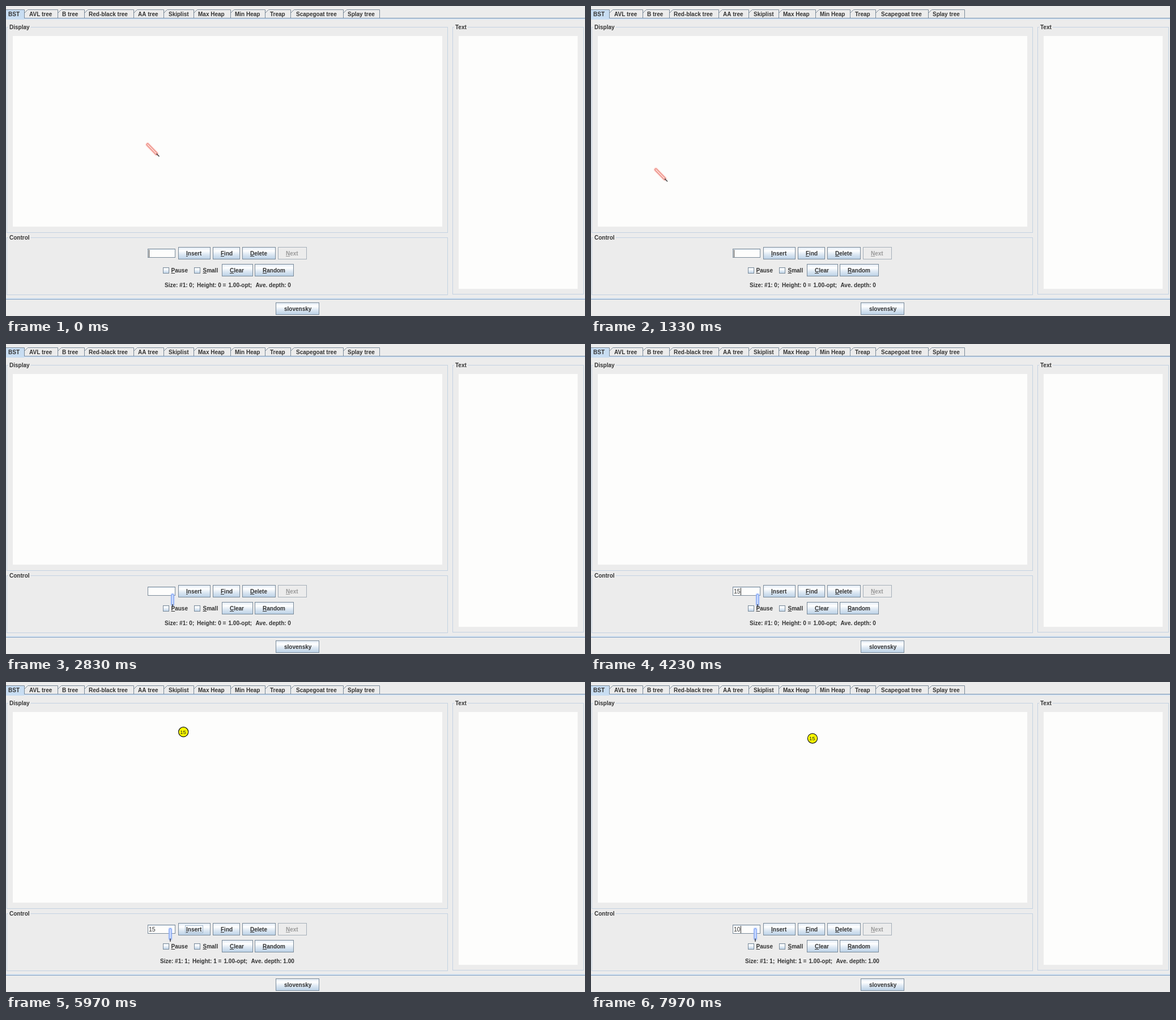
Write an HTML page with a canvas that moves like this. It is 1022 by 548 pixels and loops after 8000 ms.

```html
<!DOCTYPE html>
<html lang="en">
<head>
<meta charset="utf-8">
<title>Search tree demo</title>
<style>
html, body { margin: 0; width: 100%; height: 100%; overflow: hidden; background: #ececec; }
canvas { display: block; }
</style>
</head>
<body>
<canvas id="stage" width="1022" height="548"></canvas>
<script>
const LOOP = 8000;
const BACK = '#ececec', PAPER = '#fdfdfc', INK = '#333', EDGE = '#7a8a99';
const PALE = '#d6e4f2', SOFT = '#b8cfe5', FRAME = '#c3d2e2';
const FACE = '"Liberation Sans", Arial, sans-serif';
const ctx = document.getElementById('stage').getContext('2d');

function box(x0, y0, x1, y1, fill, stroke) {
  if (fill) { ctx.fillStyle = fill; ctx.fillRect(x0, y0, x1 - x0, y1 - y0); }
  if (stroke) {
    ctx.strokeStyle = stroke;
    ctx.lineWidth = 1;
    ctx.strokeRect(x0 + .5, y0 + .5, x1 - x0 - 1, y1 - y0 - 1);
  }
}

function line(points, color, width = 1, cap = 'butt') {
  ctx.beginPath();
  points.forEach(([x, y]) => ctx.lineTo(x, y));
  ctx.strokeStyle = color;
  ctx.lineWidth = width;
  ctx.lineCap = cap;
  ctx.stroke();
}

function label(text, x, y, { color = INK, font = 'bold 10px ', key = false } = {}) {
  ctx.font = font + FACE;
  ctx.fillStyle = color;
  ctx.fillText(text, x, y);
  if (key) ctx.fillRect(x, y + 1, ctx.measureText(text[0]).width, 1);
}

function shade(y0, y1) {
  const g = ctx.createLinearGradient(0, y0, 0, y1);
  g.addColorStop(0, '#dde8f3');
  g.addColorStop(.3, '#fff');
  g.addColorStop(.6, '#dde8f3');
  g.addColorStop(1, SOFT);
  return g;
}

function button(text, x0, y0, x1, textX, { off = false, down = false, key = true } = {}) {
  const y1 = y0 + 22;
  box(x0, y0, x1, y1, off ? BACK : down ? SOFT : shade(y0, y1), off ? '#a5afb9' : EDGE);
  label(text, textX, y0 + 15, { color: off ? '#999' : INK, key });
}

function check(text, x, textX) {
  box(x, 462, x + 11, 473, shade(462, 473), EDGE);
  label(text, textX, 471, { key: true });
}

function group(title, x0, y0, x1, y1, titleX) {
  box(x0, y0, x1, y1, null, FRAME);
  ctx.font = 'bold 10px ' + FACE;
  ctx.fillStyle = BACK;
  ctx.fillRect(titleX - 2, y0, ctx.measureText(title).width + 4, 1);
  label(title, titleX, y0 + 4);
}

const tabs = [
  ['BST', 4, 32], ['AVL tree', 41, 91], ['B tree', 99, 138], ['Red-black tree', 146, 225],
  ['AA tree', 233, 278], ['Skiplist', 287, 331], ['Max Heap', 339, 396], ['Min Heap', 404, 457],
  ['Treap', 466, 502], ['Scapegoat tree', 512, 595], ['Splay tree', 603, 659]
];

function drawTabs() {
  box(0, 22, 1022, 24, PALE);
  box(0, 6, 32, 24, '#c8ddf2');
  let left = 0;
  tabs.forEach(([name, x, right], i) => {
    const start = i ? [[left + .5, 12.5], [left + 6.5, 6.5]] : [[0, 6.5]];
    line([...start, [right + .5, 6.5], [right + .5, 21.5]], EDGE);
    label(name, x, 18);
    left = right;
  });
  line([[32, 21.5], [1022, 21.5]], '#7590b0');
}

// Caret blinks with a 500 ms half period; each edit restarts it.
const blink = (t, since) => Math.floor((t - since) / 500) % 2 === 0;

function fieldState(t) {
  if (t < 4100) return { text: '', caret: blink(t, -100) };
  if (t < 4200) return { text: '1', caret: true };
  if (t < 5600) return { text: '15', caret: blink(t, 4200) };
  if (t < 6350) return { text: '15', caret: false };
  if (t < 6600) return { text: '15', caret: true };
  if (t < 7450) return { text: '15', caret: blink(t, 6600), marked: true };
  if (t < 7600) return { text: '1', caret: true };
  return { text: '10', caret: blink(t, 7600) };
}

function drawField(t) {
  const { text, caret, marked } = fieldState(t);
  const font = '10.5px ';
  box(250, 429, 299, 445, PAPER, EDGE);
  line([[251, 430.5], [298, 430.5]], '#dbe6f1');
  ctx.font = font + FACE;
  const end = Math.round(252 + ctx.measureText(text).width);
  if (marked) box(252, 431, end, 443, SOFT);
  label(text, 252, 441, { font });
  if (caret) box(end, 431, end + 1, 444, INK);
}

function drawStats(t) {
  const n = t < 5650 ? 0 : 1;
  const x = n ? 272 : 280;
  label(`Size: #1: ${n};`, x, 497);
  label(`Height: ${n} =`, x + 57, 497);
  label('1.00-opt;', x + 112.5, 497);
  label('Ave. depth: ' + (n ? '1.00' : '0'), x + 160.5, 497);
}

function drawNode(t) {
  const k = Math.min(10, Math.floor((t - 5590) / 46.5));
  if (k < 2) return;
  const x = 391 - 38.9 * (10 - k), y = 99.7 - 5.7 * (10 - k);
  ctx.beginPath();
  ctx.arc(x, y, 8.6, 0, 2 * Math.PI);
  ctx.fillStyle = '#ff0';
  ctx.fill();
  ctx.strokeStyle = '#111';
  ctx.lineWidth = 1.2;
  ctx.stroke();
  label('15', x - 6, y + 3.5, { font: '9.5px ', color: '#222' });
}

// Cursor stops: time, x, y of its upper end.
const stops = [
  [860, 249, 244], [1300, 113.5, 288.3], [1600, 113.5, 288.3], [2350, 294, 442],
  [4950, 294, 442], [5300, 313, 436], [5660, 313, 436], [5900, 290, 435.5]
];

function cursorAt(t) {
  if (t <= stops[0][0]) return stops[0].slice(1);
  for (let i = 1; i < stops.length; i++) {
    const [t0, x0, y0] = stops[i - 1], [t1, x1, y1] = stops[i];
    if (t < t1) {
      const u = (t - t0) / (t1 - t0), e = u * u * (3 - 2 * u);
      return [x0 + (x1 - x0) * e, y0 + (y1 - y0) * e];
    }
  }
  return stops[stops.length - 1].slice(1);
}

function pen(a, b, tip, [glow, edge, core]) {
  line([a, b], glow, 8, 'round');
  line([a, b], edge, 5, 'round');
  line([a, b], core, 2.2, 'round');
  line([b, tip], '#454545', 1.6);
}

function drawCursor(t) {
  const [x, y] = cursorAt(t);
  const overField = x >= 250 && x < 299 && y >= 429 && y < 445;
  if (overField) {
    pen([x, y + 2], [x, y + 18], [x, y + 23.5],
      ['rgba(160,190,255,.3)', '#82a5f3', '#d3e1ff']);
  } else {
    pen([x + 1, y + 1], [x + 16.5, y + 17], [x + 21.5, y + 22],
      ['rgba(255,170,160,.3)', '#ec8a82', '#fbd5ce']);
  }
}

function draw(t) {
  box(0, 0, 1022, 548, BACK);
  drawTabs();
  group('Display', 1, 37, 780, 401, 6);
  group('Control', 1, 409, 780, 511, 6);
  group('Text', 788, 37, 1020, 510, 793);
  box(12, 53, 770, 390, PAPER);
  box(799, 53, 1009, 500, PAPER);

  drawField(t);
  button('Insert', 304, 426, 361, 318, { down: t >= 5530 && t < 5640 });
  button('Find', 365, 426, 413, 379);
  button('Delete', 417, 426, 476, 431);
  button('Next', 480, 426, 531, 494, { off: true });
  if (t >= 5600 && t < 6350) box(316, 430, 348, 444, null, '#a3b8cc');
  check('Pause', 277, 291.5);
  check('Small', 332, 347.5);
  button('Clear', 381, 456, 436, 395);
  button('Random', 439, 456, 508, 453);
  drawStats(t);

  box(0, 516, 1022, 518, PALE);
  box(0, 518, 1022, 519, '#7f9fc4');
  button('slovensky', 476, 524, 553, 491, { key: false });
  drawNode(t);
  drawCursor(t);
}

const begin = performance.now();
function tick() {
  draw((performance.now() - begin) % LOOP);
  requestAnimationFrame(tick);
}
tick();
</script>
</body>
</html>
```
